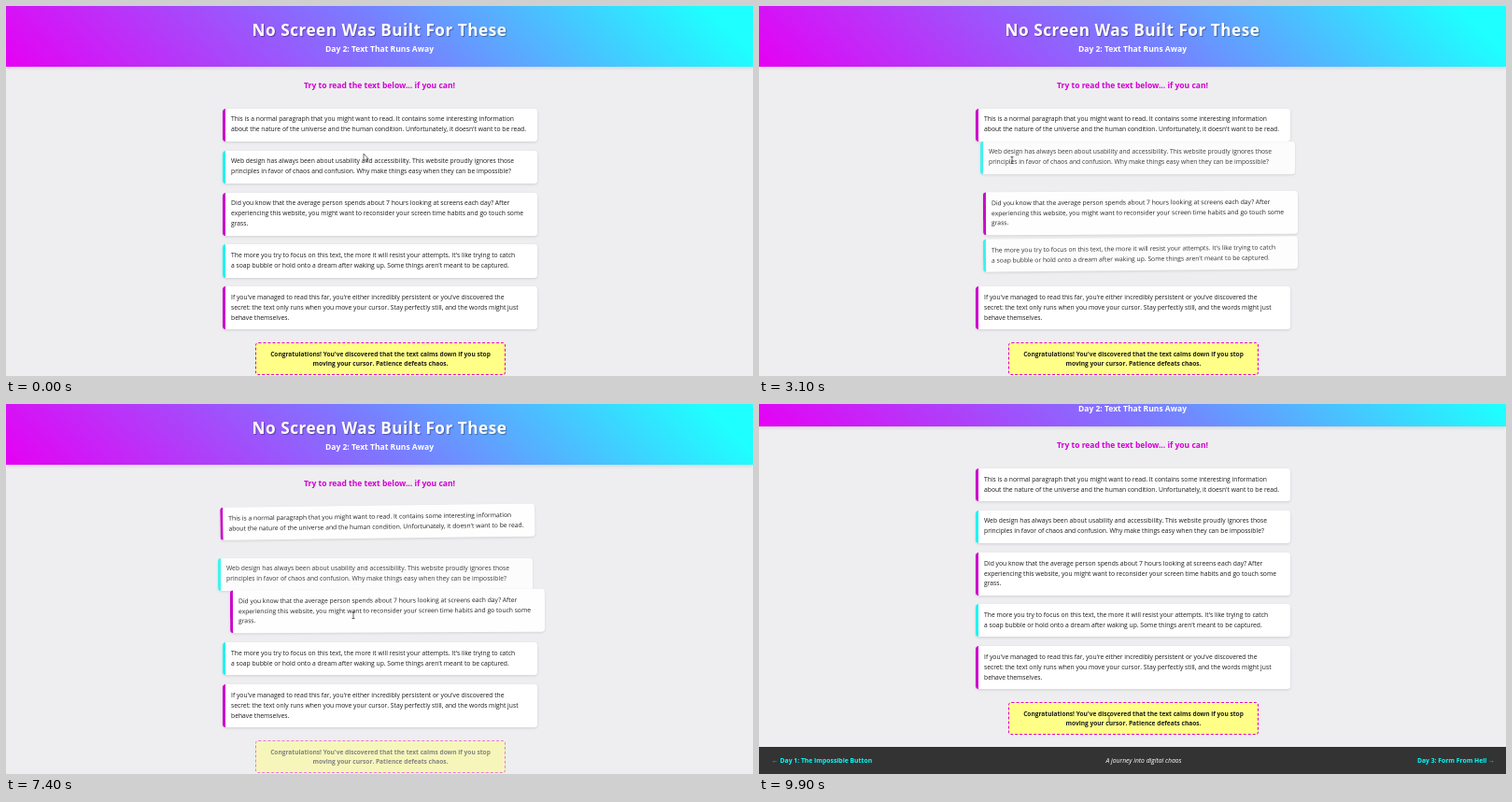
Animation, 800 px wide and 396 px high, one loop 10 s. Source, as an HTML page:

```html
<!DOCTYPE html>
<html lang="en">
<head>
<meta charset="utf-8">
<style>
  html, body { margin: 0; width: 100%; height: 100%; overflow: hidden; }
  body { position: relative; background: #eeeef0; color: #1c1c1c; font: 6.76px/10.8px "Open Sans", sans-serif; }
  #page { position: absolute; left: 0; top: 0; width: 800px; height: 437px; }
  #page > * { position: absolute; box-sizing: border-box; margin: 0; white-space: pre; }
  header { width: 800px; height: 65px; background: linear-gradient(45deg, #e600f4, #7a7cff 50%, #1effff 94%);
    box-shadow: 0 1px 4px rgba(0,0,0,.15); }
  h1, h2, h3 { left: 0; width: 800px; text-align: center; font-weight: 700; color: #fff; }
  h1 { top: 13px; font-size: 17.2px; line-height: 25px; letter-spacing: .5px; text-shadow: 1px 1px 1px rgba(0,0,0,.35); }
  h2 { top: 40px; font-size: 8.53px; line-height: 12px; }
  h3 { top: 78.5px; font-size: 8.5px; line-height: 12px; color: #d400d4; }
  #page > main { left: 232px; top: 109.7px; width: 337px; white-space: normal; }
  .card { margin: 0 0 9.9px; padding: 6.75px 6px; border-left: 3px solid #cc00cc; border-radius: 3.5px;
    background: #fff; box-shadow: 0 1px 3px rgba(0,0,0,.13); white-space: pre; }
  .card:nth-of-type(even) { border-color: #1ff4f0; }
  #note { left: 267px; top: 360px; width: 268px; height: 34.5px; padding-top: 6.7px; text-align: center;
    font-size: 6.6px; line-height: 9.9px; font-weight: 700; background: #ffff88;
    border: 1px dashed #e000d0; border-radius: 3.5px; }
  footer { top: 408px; width: 800px; height: 29px; padding: 0 12px 0 14px; background: #333; color: #0ff;
    font-size: 6.8px; line-height: 30px; font-weight: 700; }
  footer i { position: absolute; left: 0; width: 824px; text-align: center; color: #fff; font-weight: 400; }
  footer b { position: absolute; right: 12px; }
  svg { position: absolute; left: 0; top: 0; overflow: visible; }
</style>
</head>
<body>
<div id="page">
  <header></header>
  <h1>No Screen Was Built For These</h1>
  <h2>Day 2: Text That Runs Away</h2>
  <h3>Try to read the text below... if you can!</h3>
  <main>
    <p class="card">This is a normal paragraph that you might want to read. It contains some interesting information
about the nature of the universe and the human condition. Unfortunately, it doesn't want to be read.</p>
    <p class="card">Web design has always been about usability and accessibility. This website proudly ignores those
principles in favor of chaos and confusion. Why make things easy when they can be impossible?</p>
    <p class="card">Did you know that the average person spends about 7 hours looking at screens each day? After
experiencing this website, you might want to reconsider your screen time habits and go touch some
grass.</p>
    <p class="card">The more you try to focus on this text, the more it will resist your attempts. It's like trying to catch
a soap bubble or hold onto a dream after waking up. Some things aren't meant to be captured.</p>
    <p class="card">If you've managed to read this far, you're either incredibly persistent or you've discovered the
secret: the text only runs when you move your cursor. Stay perfectly still, and the words might just
behave themselves.</p>
  </main>
  <div id="note">Congratulations! You've discovered that the text calms down if you stop
moving your cursor. Patience defeats chaos.</div>
  <footer>← Day 1: The Impossible Button<i>A journey into digital chaos</i><b>Day 3: Form From Hell →</b></footer>
</div>
<svg id="cursor" width="8" height="12">
  <path id="arrow" d="M0 0V7.6L1.7 6.1L2.9 8.8L4.1 8.2L3 5.7H5.2Z" fill="#fff" stroke="#333" stroke-width=".7"/>
  <path id="beam" d="M-1.5 -3.5H1.5M0 -3.5V3.5M-1.5 3.5H1.5" fill="none" stroke="#444" stroke-width=".8"/>
</svg>
<script>
  const $ = id => document.getElementById(id);
  const cards = [...document.querySelectorAll('.card')];

  // Each card flees along one direction; hits map a time to a strength
  const flights = [
    { x: -2.7, y: -1.3, turn: -.7, hits: { 7400: 1 } },
    { x: -5, y: 10, turn: 0, hits: { 3100: -1, 7400: 1 } },
    { x: 8, y: -1.5, turn: -.25, hits: { 1500: 3, 3100: 1, 7400: 1, 9100: .8 } },
    { x: 8, y: -7, turn: -.6, hits: { 3100: 1 } },
    { x: -.7, y: -3.5, turn: 0, hits: { 9100: 1 } }
  ];

  // Time, x, y of the places where the cursor turns
  const stops = [[0, 383, 158], [1500, 375, 285], [3100, 271, 165], [6100, 189, 45],
    [7400, 372, 226], [9100, 347, 318], [9900, 375, 337]];

  const ramp = (t, from, to) => {
    const u = Math.min(1, Math.max(0, (t - from) / (to - from)));
    return u * u * (3 - 2 * u);
  };

  // Quick flight before the peak, slower return after it
  const pulse = (t, peak) => ramp(t, peak - 600, peak) * (1 - ramp(t, peak, peak + 800));

  const pointer = (t, axis) => stops.reduce((sum, stop, i) =>
    i ? sum + (stop[axis] - stops[i - 1][axis]) * ramp(t, stops[i - 1][0], stop[0]) : stop[axis], 0);

  function draw(now) {
    const t = Math.floor(now % 10000 / 100) * 100;
    flights.forEach(({ x, y, turn, hits }, i) => {
      const push = Object.entries(hits).reduce((sum, [peak, force]) => sum + force * pulse(t, +peak), 0);
      cards[i].style.transform = `translate(${x * push}px,${y * push}px) rotate(${turn * push}deg)`;
      cards[i].style.opacity = 1 - Math.abs(y * push) / 60;
    });
    $('note').style.opacity = 1 - ramp(t, 4900, 5400) + ramp(t, 7100, 7700);
    $('page').style.transform = `translateY(${-41 * ramp(t, 9300, 9800)}px)`;

    const overText = t >= 2600 && t < 5000 || t >= 6800;
    $('cursor').style.transform = `translate(${pointer(t, 1)}px,${pointer(t, 2)}px)`;
    $('arrow').style.display = overText ? 'none' : '';
    $('beam').style.display = overText ? '' : 'none';
  }

  const start = performance.now();
  function tick() {
    draw(performance.now() - start);
    requestAnimationFrame(tick);
  }
  tick();
</script>
</body>
</html>
```
